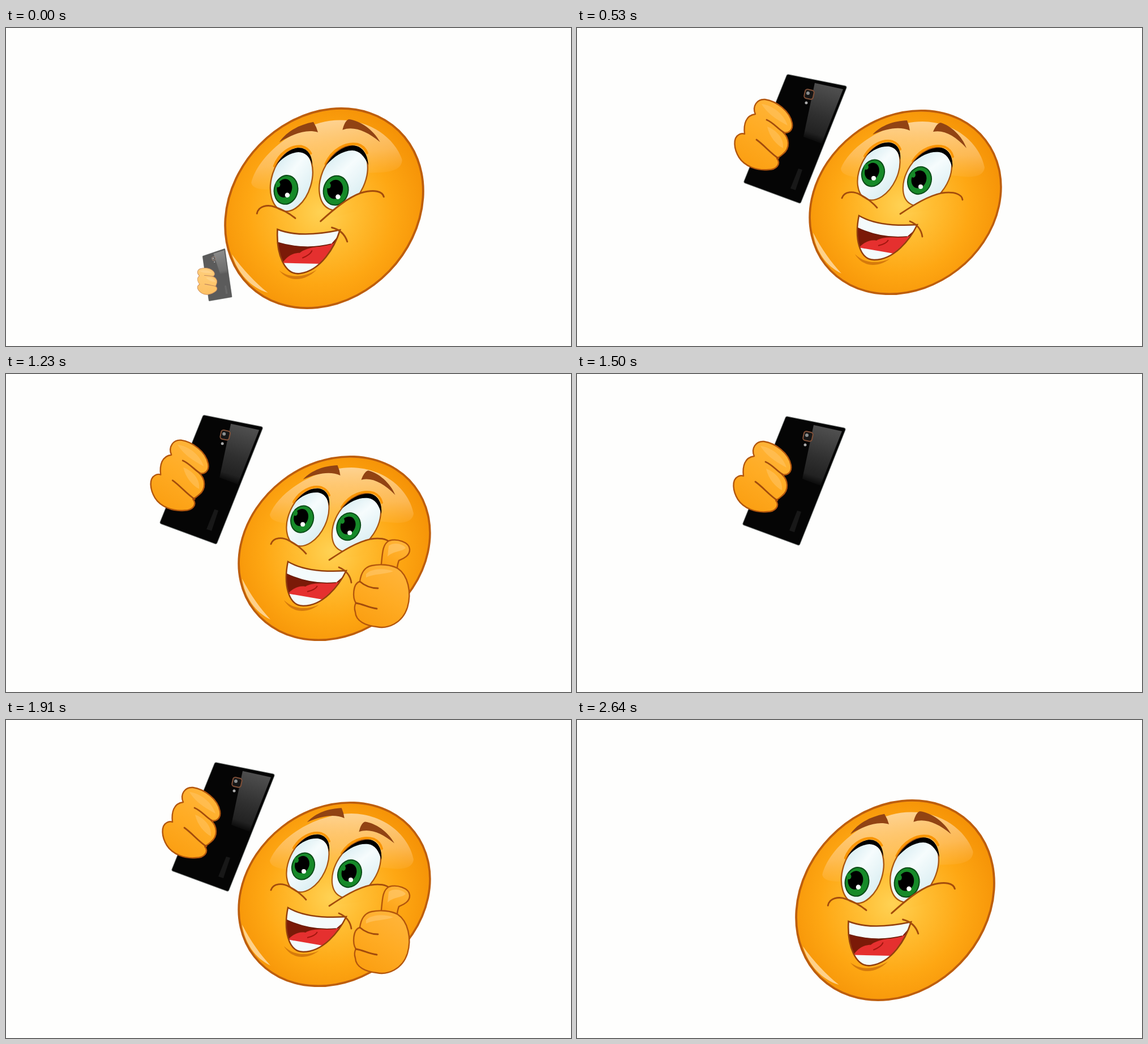
These frames come from a looping animation (998 px wide and 561 px high, 2.8 s). An HTML page:

```html
<!DOCTYPE html>
<html lang="en">
<head>
<meta charset="utf-8">
<title>Selfie smiley</title>
<style>
html, body { margin: 0; width: 100%; height: 100%; overflow: hidden; background: #fefefd; }
svg { display: block; width: 100vw; height: 100vh; }
.line { fill: none; stroke: #a34c0c; stroke-width: 2.8; stroke-linecap: round; }
.skin { stroke: #b3560c; stroke-width: 2.4; stroke-linejoin: round; }
.eye { fill: url(#white); stroke: #a9560f; stroke-width: 2.2; }
.lid { fill: none; stroke: #fb9500; stroke-width: 4; stroke-linecap: round; }
.brow { fill: #914313; }
.iris { fill: #168a29; stroke: #0b4d18; stroke-width: 2; }
</style>
</head>
<body>
<svg viewBox="0 0 998 561" preserveAspectRatio="none">
  <defs>
    <radialGradient id="ball" gradientUnits="userSpaceOnUse" cx="572" cy="308" r="185">
      <stop offset="0" stop-color="#ffd254"/>
      <stop offset=".3" stop-color="#ffbd32"/>
      <stop offset=".65" stop-color="#fea713"/>
      <stop offset="1" stop-color="#f59206"/>
    </radialGradient>
    <linearGradient id="shine" x1="0" y1="0" x2="0" y2="1">
      <stop offset="0" stop-color="#ffdca8" stop-opacity=".85"/>
      <stop offset=".6" stop-color="#ffcf8c" stop-opacity=".55"/>
      <stop offset="1" stop-color="#ffc878" stop-opacity=".1"/>
    </linearGradient>
    <linearGradient id="white" x1="0" y1="0" x2="1" y2=".6">
      <stop offset="0" stop-color="#cfe8ee"/>
      <stop offset=".5" stop-color="#f6fcfd"/>
      <stop offset="1" stop-color="#dceff3"/>
    </linearGradient>
    <linearGradient id="skin" x1=".8" y1="0" x2=".3" y2="1">
      <stop offset="0" stop-color="#ffb53c"/>
      <stop offset=".5" stop-color="#ffac24"/>
      <stop offset="1" stop-color="#fb9f12"/>
    </linearGradient>
    <linearGradient id="glass" gradientUnits="userSpaceOnUse" x1="450" y1="98" x2="416" y2="202">
      <stop offset="0" stop-color="#525252"/>
      <stop offset=".55" stop-color="#303030"/>
      <stop offset=".85" stop-color="#222"/>
      <stop offset="1" stop-color="#050505"/>
    </linearGradient>
    <ellipse id="eyeL" cx="533" cy="253.5" rx="33.2" ry="53" transform="rotate(25 533 253.5)"/>
    <ellipse id="eyeR" cx="619" cy="262.5" rx="36" ry="56.5" transform="rotate(33 619 262.5)"/>
    <path id="lips" d="M498 331C522 345 555 350 601 347C588 374 560 409 525 409C498 409 490 370 498 331Z"/>
    <clipPath id="inL"><use href="#eyeL"/></clipPath>
    <clipPath id="inR"><use href="#eyeR"/></clipPath>
    <clipPath id="inMouth"><use href="#lips"/></clipPath>
  </defs>

  <g id="head">
    <ellipse cx="580" cy="307.5" rx="179" ry="150.5" transform="rotate(-37.8 580 307.5)" fill="url(#ball)" stroke="#bd5e0e" stroke-width="3.6"/>
    <path fill="url(#shine)" d="M466 248C482 208 545 166 610 165C670 166 712 205 720 246C718 262 700 264 680 262C610 252 560 266 510 265C484 263 467 260 466 248Z"/>
    <path fill="#ffdba2" opacity=".85" d="M417 361C422 394 440 420 467 433C448 412 432 390 417 361Z"/>

    <path class="lid" d="M508 226C519 206 540 196 557 200C565 203 569 208 571 214"/>
    <use class="eye" href="#eyeL"/>
    <g clip-path="url(#inL)"><g id="lookL">
      <ellipse class="iris" cx="523" cy="256" rx="19.5" ry="24" transform="rotate(20 523 256)"/>
      <ellipse cx="521" cy="253" rx="12.5" ry="15.5" transform="rotate(20 521 253)"/>
      <ellipse cx="511" cy="245" rx="4" ry="5" fill="#168a29"/>
      <circle cx="524" cy="265" r="4" fill="#fff"/>
    </g></g>
    <path d="M511 226C523 209 540 200 553 202C566 204 573 216 571 233C568 218 562 211 551 209C537 208 523 214 511 226Z"/>

    <path class="lid" d="M593 235C607 212 632 204 650 210C657 213 662 219 664 227"/>
    <use class="eye" href="#eyeR"/>
    <g clip-path="url(#inR)"><g id="lookR">
      <ellipse class="iris" cx="605" cy="269" rx="20.5" ry="24.5" transform="rotate(20 605 269)"/>
      <ellipse cx="604" cy="267" rx="13" ry="16" transform="rotate(20 604 267)"/>
      <ellipse cx="594" cy="259" rx="4" ry="5" fill="#168a29"/>
      <circle cx="607" cy="280" r="4" fill="#fff"/>
    </g></g>
    <path d="M594 237C607 219 626 210 642 211C657 213 665 228 663 247C659 231 652 221 640 219C624 217 608 225 594 237Z"/>

    <path fill="url(#ball)" d="M483 292C500 293 516 305 530 317L508 319Z"/>
    <path fill="url(#ball)" d="M571 328C595 312 620 296 645 291L632 320Z"/>
    <path class="line" d="M468 300C472 288 488 287 500 294C512 300 522 308 530 317"/>
    <path class="line" d="M571 328C595 312 620 296 645 291C668 288 680 294 681 303"/>

    <path id="browL" class="brow" d="M522 188C538 171 560 164 583 163Q587 172 588 181C570 173 548 177 522 188Z"/>
    <path id="browR" class="brow" d="M629 183C632 176 636 168 642 167C660 172 680 190 688 212C668 190 648 179 629 183Z"/>

    <path fill="#d57a0c" d="M491 399C507 415 530 417 553 407C530 424 504 421 491 399Z"/>
    <g clip-path="url(#inMouth)">
      <rect x="485" y="325" width="125" height="90" fill="#7b1a08"/>
      <path fill="#e5302f" d="M496 390C505 379 516 373 529 375C542 367 562 370 590 367L570 412L496 412Z"/>
      <path fill="none" stroke="#a3160f" stroke-width="2" d="M532 384Q546 381 550 374"/>
      <path fill="#f4fbfc" d="M490 386L560 398L550 415L490 415Z"/>
      <path fill="#f4fbfc" d="M490 325L606 335L604 350L583 368C553 371 520 365 490 350Z"/>
      <path fill="none" stroke="#6b1c08" stroke-width="1.5" d="M490 350C520 365 553 371 583 368"/>
    </g>
    <use href="#lips" fill="none" stroke="#93400d" stroke-width="2.5"/>
    <path class="line" d="M588 341C600 346 608 355 610 368"/>
  </g>

  <g id="phone">
    <path d="M373 85L473 105L393 306L298 271Z" fill="#050505" stroke="#6f7371" stroke-width="7" stroke-linejoin="round"/>
    <path d="M373 85L473 105L393 306L298 271Z" fill="#050505" stroke="#050505" stroke-width="5" stroke-linejoin="round"/>
    <path fill="url(#glass)" d="M420 97L470 108L432 204L400 192Z"/>
    <path fill="#181818" d="M391 248L398 250L386 286L377 283Z"/>
    <rect x="402" y="109" width="16" height="16" rx="4" fill="#161616" stroke="#805038" stroke-width="2" transform="rotate(12 410 117)"/>
    <circle cx="408" cy="115" r="3" fill="#8b8f90"/>
    <circle cx="405" cy="132" r="2.5" fill="#aaa"/>
    <path class="skin" fill="url(#skin)" d="M315 152C309 138 318 125 332 126C352 129 376 146 380 168C382 180 374 187 364 184C375 194 377 212 364 222Q360 226 353 230C361 240 352 250 338 250C318 252 296 244 286 228C277 213 275 194 286 188Q291 185 296 187C294 170 298 154 315 152Z"/>
    <path fill="#ffc76a" opacity=".5" d="M326 134C345 136 366 152 372 172C358 164 338 154 326 134ZM336 174C352 180 366 194 364 212C352 206 340 192 336 174Z"/>
    <path class="line" d="M335 162C347 167 355 178 365 184M317 197C330 206 343 222 356 230"/>
  </g>

  <g id="thumb">
    <path class="skin" fill="url(#skin)" d="M662 345C665 318 664 300 677 294C690 290 712 296 713 309C714 322 698 327 694 329Q691 337 690 350Z"/>
    <path fill="#ffcb74" opacity=".6" d="M676 303C686 296 702 300 706 307C698 314 684 312 674 322Z"/>
    <path class="skin" fill="url(#skin)" d="M692 343C710 355 717 385 709 412C700 440 674 450 655 446C635 444 618 436 617 420Q614 411 618 404C612 395 612 370 625 366C627 352 632 341 646 338C660 335 680 336 692 343Z"/>
    <path fill="#ffcb74" opacity=".55" d="M636 353C645 343 668 342 684 348C668 354 650 352 636 359Z"/>
    <path class="line" d="M625 366C633 373 644 378 657 378M618 404C631 406 640 412 655 414"/>
  </g>
</svg>
<script>
const LOOP = 2800;
const $ = id => document.getElementById(id);
const clamp = v => Math.min(1, Math.max(0, v));
const span = (t, a, b) => clamp((t - a) / (b - a));
const smooth = p => p * p * (3 - 2 * p);
const put = (id, value) => $(id).setAttribute("transform", value);

// Move a part so that it turns and scales about its own centre.
function pose(id, [cx, cy], dx, dy, turn, size) {
  put(id, `translate(${cx + dx} ${cy + dy}) rotate(${turn}) scale(${size}) translate(${-cx} ${-cy})`);
}

function fade(id, alpha) {
  $(id).style.opacity = alpha;
  $(id).style.display = alpha > 0 ? "" : "none";
}

// Each key is a time followed by the values reached at that time.
function follow(keys, t, ease = smooth) {
  let i = 0;
  while (i < keys.length - 2 && t > keys[i + 1][0]) i++;
  const a = keys[i], b = keys[i + 1];
  const p = ease(span(t, a[0], b[0]));
  return a.slice(1).map((v, k) => v + (b[k + 1] - v) * p);
}

const flight = [ // time, dx, dy, turn, size, alpha
  [0, -11.5, 245, -30, 0.39, 0.65],
  [20, -11.5, 245, -30, 0.39, 0.65],
  [220, -36, -26, 0, 1, 1],
  [530, 0, 0, 0, 1, 1],
  [930, -28.5, -9, 0, 1, 1],
  [1110, -29, -10, 0, 1, 1],
  [1500, -2, -7, 0, 1, 1],
  [LOOP, -2, -7, 0, 1, 1]
];
const brows = [[0, 0], [530, 0], [930, 1], [1350, 0], [1910, 0.75], [2210, 0.45], [2640, 0], [LOOP, 0]];
const gaze = [[0, -1.5, 12], [30, -1.5, 12], [490, 0, 0], [1100, 0, 0], [1910, 2, 2], [2210, 4, 2], [2640, -1.5, 12], [LOOP, -1.5, 12]];

function drawHead(t) {
  const back = 1 - (1 - span(t, 2140, 2640)) ** 2;
  const lean = 1 - smooth(span(t, 30, 490)) + back;
  pose("head", [580, 307.5], -18 * lean, 10.5 * lean, -8.3 * lean, 1 + 0.061 * lean);
  const [gx, gy] = follow(gaze, t);
  for (const id of ["lookL", "lookR"]) put(id, `translate(${gx} ${gy})`);
  const [lift] = follow(brows, t);
  put("browL", `translate(${13 * lift} ${-10.5 * lift})`);
  pose("browR", [655, 187], -7 * lift, 14 * lift, -11 * lift, 1);
}

function drawPhone(t) {
  const [dx, dy, turn, size, alpha] = follow(flight, t);
  const out = span(t, 2136, 2372);
  const away = out ** 0.7;
  pose("phone", [384.5, 192], dx + 97 * away, dy - 123 * away, turn, size * (1 - out));
  fade("phone", alpha * (1 - out));
}

function drawThumb(t, shown) {
  const q = span(t, 820, 1070) * (1 - span(t, 2240, 2440));
  const r = 1 - q, drift = span(t, 2150, 2210);
  pose("thumb", [663, 393], 71 * r - 3 * drift, 57 * r + 2.5 * drift, -90 * r, 1 - 0.27 * r);
  fade("thumb", shown ? q : 0);
}

function draw(t) {
  const shown = t < 1370 || t >= 1700;
  fade("head", shown ? 1 : 0);
  drawHead(t);
  drawPhone(t);
  drawThumb(t, shown);
}

const start = performance.now();
function tick() {
  draw((performance.now() - start) % LOOP);
  requestAnimationFrame(tick);
}
tick();
</script>
</body>
</html>
```
